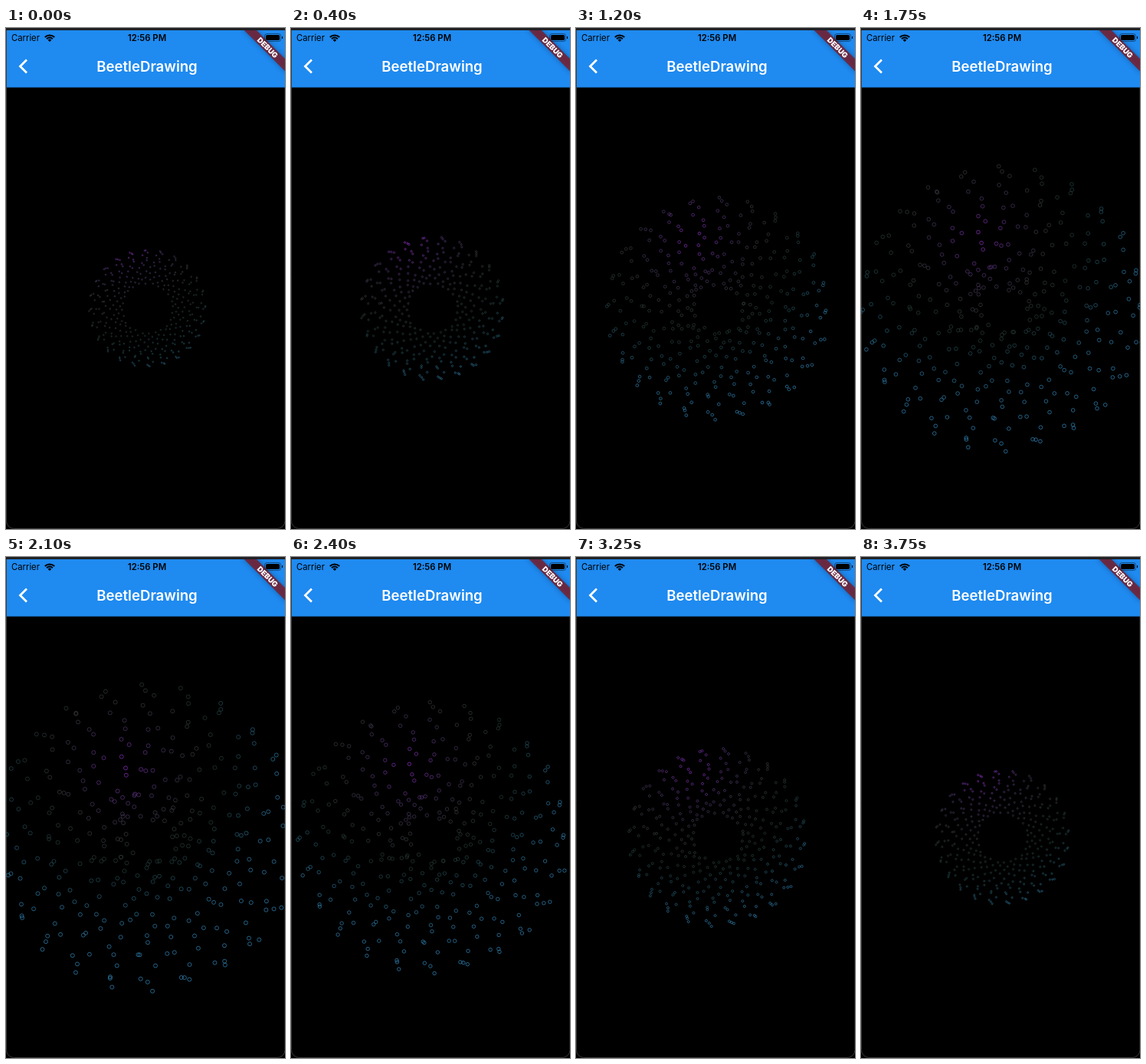
These frames come from a looping animation (364 by 654 pixels, 3800 ms). An HTML page with a canvas:

```html
<!DOCTYPE html>
<html lang="en">
<head>
<meta charset="utf-8">
<title>BeetleDrawing</title>
<style>
  html, body { margin: 0; width: 364px; height: 654px; overflow: hidden; background: #000; }
  canvas { display: block; }
</style>
</head>
<body>
<canvas id="stage" width="364" height="654"></canvas>
<script>
const ctx = document.getElementById('stage').getContext('2d');
const LOOP = 3800, STEP = 50, TURN = 2015, ARMS = 24;
const CX = 184.5, CY = 366;
const rad = deg => deg * Math.PI / 180;

// Dots of one arm near full bloom: [radius, degrees].
const armDots = [
  [181, -1.2], [178, .2], [172, 2.3], [161, -2.7], [149, 3.5],
  [139, 4.6], [127, -.7], [117, 2], [109, 11.5], [92, 8],
  [79, 1], [66, 10], [52, 4], [39, 12]
];

// Repeatable scatter in -1..1.
function noise(n) {
  const v = Math.sin(n * 12.9898 + 4.1) * 43758.5453;
  return 2 * (v - Math.floor(v)) - 1;
}

// Violet centre, grey, green, then blue, fixed on the screen.
const ink = ctx.createRadialGradient(153, 274, 0, 153, 274, 260);
[[0, '#8429b5'], [.09, '#652a8e'], [.2, '#412f58'], [.33, '#323237'],
 [.5, '#20332e'], [.63, '#1e4a58'], [.76, '#296c92'], [1, '#2b78a6']]
  .forEach(([stop, color]) => ink.addColorStop(stop, color));

function text(str, x, y, font, color, align = 'left') {
  ctx.font = font + ' Inter, sans-serif';
  ctx.fillStyle = color;
  ctx.textAlign = align;
  ctx.fillText(str, x, y);
}

function roundBox(x, y, w, h, r) {
  ctx.beginPath();
  ctx.roundRect(x, y, w, h, r);
}

function drawDots(time) {
  const t = time < TURN ? time : 2 * TURN - time;
  const outer = Math.sqrt(5776 + 4.6 * t + .0064 * t * t);
  const inner = 33;
  const drift = 18 * Math.exp(-t / 1200) - 4.2;
  const size = .8 + .00088 * t;
  const scatter = 1 + 6 * (t / 1750) ** 2;
  ctx.strokeStyle = ink;
  ctx.lineWidth = 1;
  ctx.beginPath();
  armDots.forEach(([r, deg], i) => {
    const u = (r - 39) / 142;
    const dist = inner + (outer - inner) * u;
    const spread = scatter * (1.2 - .6 * u);
    for (let arm = 0; arm < ARMS; arm++) {
      const a = rad(deg + arm * 360 / ARMS + drift * u);
      const id = i * ARMS + arm;
      const x = CX + dist * Math.sin(a) + spread * noise(id);
      const y = CY - dist * Math.cos(a) + spread * noise(id + 1000);
      ctx.moveTo(x + size, y);
      ctx.arc(x, y, size, 0, 2 * Math.PI);
    }
  });
  ctx.globalAlpha = .82;
  ctx.stroke();
  ctx.globalAlpha = 1;
}

function drawWifi() {
  ctx.strokeStyle = '#000';
  ctx.lineWidth = 2;
  for (const r of [8.6, 5.4]) {
    ctx.beginPath();
    ctx.arc(57, 18, r, rad(-136), rad(-44));
    ctx.stroke();
  }
  ctx.fillStyle = '#000';
  ctx.beginPath();
  ctx.moveTo(57, 18);
  ctx.arc(57, 18, 3.2, rad(-136), rad(-44));
  ctx.fill();
}

function drawBanner() {
  ctx.save();
  ctx.beginPath();
  ctx.rect(1, 3, 363, 651);
  ctx.clip();
  ctx.translate(364, 3);
  ctx.rotate(Math.PI / 4);
  ctx.shadowColor = 'rgba(0,0,0,.8)';
  ctx.shadowBlur = 7;
  ctx.fillStyle = 'rgba(0,0,0,.4)';
  ctx.fillRect(-40, 26.3, 80, 11.3);
  ctx.shadowColor = 'transparent';
  ctx.fillStyle = 'rgba(165,28,40,.6)';
  ctx.fillRect(-40, 26.3, 80, 11.3);
  text('DEBUG', 0, 35.5, '900 9.6px', '#fff', 'center');
  ctx.restore();
}

function drawBattery() {
  ctx.strokeStyle = 'rgba(0,0,0,.45)';
  ctx.lineWidth = 1;
  roundBox(337.5, 7.5, 21, 10, 3);
  ctx.stroke();
  ctx.fillStyle = '#000';
  roundBox(339, 9, 18, 7, 1.8);
  ctx.fill();
  ctx.fillRect(360, 11, 1, 3);
}

function drawBar() {
  ctx.fillStyle = '#1f8af0';
  ctx.fillRect(1, 3, 363, 74.6);
  text('Carrier', 7, 17, '400 11.3px', '#000');
  text('12:56 PM', 184, 17, '600 11.3px', '#000', 'center');
  drawWifi();
  ctx.strokeStyle = '#fff';
  ctx.lineWidth = 2.8;
  ctx.beginPath();
  ctx.moveTo(27, 41.5);
  ctx.lineTo(18.5, 50);
  ctx.lineTo(27, 58.5);
  ctx.stroke();
  text('BeetleDrawing', 184, 56.5, '600 18.6px', '#fff', 'center');
  drawBanner();
  drawBattery();
}

function drawFrame(time) {
  ctx.fillStyle = '#000';
  ctx.fillRect(0, 0, 364, 654);
  ctx.strokeStyle = '#3c3c3c';
  ctx.lineWidth = 1;
  roundBox(.5, -10, 363.5, 663.5, 10);
  ctx.stroke();
  drawDots(time);
  ctx.fillStyle = '#202124';
  ctx.fillRect(0, 0, 364, 3);
  drawBar();
}

const start = performance.now();
function tick() {
  const time = (performance.now() - start) % LOOP;
  drawFrame(Math.floor(time / STEP) * STEP);
  requestAnimationFrame(tick);
}
tick();
</script>
</body>
</html>
```
